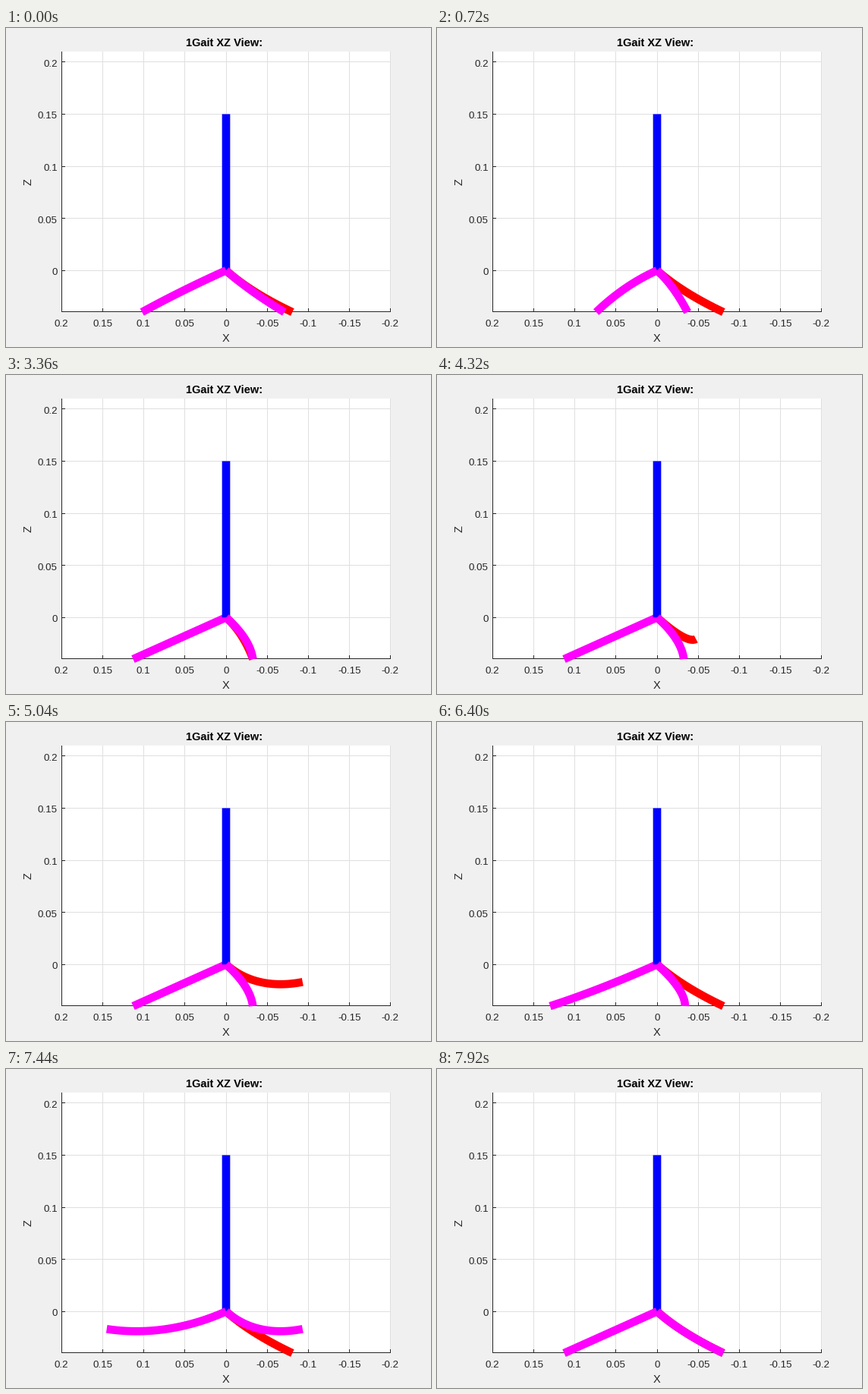
A matplotlib script that plays this animation: 560x420 px, repeating every 8000 ms.

```python
import numpy as np
import matplotlib.pyplot as plt
from matplotlib.animation import FuncAnimation
from matplotlib.patches import Rectangle

W, H, DPI = 560, 420, 100
PX = 72 / DPI                      # one pixel in points
FRAMES, STEP_MS = 100, 80
INK, GRID, PAPER = "#262626", "#dfdfdf", "#f0f0f0"

LIMB = 0.15                        # limb length
BEND = 0.55                        # total bending angle, rad
FLOOR = -0.04                      # lower limit of the z axis
TURN = np.pi / 20                  # bending direction change per frame
REAR = 2 * np.pi / 3               # azimuth of the two rear legs
SIDE = np.sin(REAR)
BEHIND, BODY, FRONT = 4, 5, 6      # depth layers

plt.rcParams["font.family"] = "Liberation Sans"
fig = plt.figure(figsize=(W / DPI, H / DPI), dpi=DPI, facecolor=PAPER)
ax = fig.add_axes([0, 0, 1, 1])
ax.set_xlim(0, W)
ax.set_ylim(H, 0)
ax.axis("off")


def px(x):
    return 290 - 1083 * x


def py(z):
    return 319.2 - 1372 * z


def rule(xs, ys, color, z):
    ax.plot(xs, ys, color=color, lw=PX, solid_capstyle="butt", zorder=z,
            snap=False)


def label(x, y, text, size=13.33, color=INK, **kw):
    kw = {"ha": "center", "va": "baseline", **kw}
    ax.text(x, y, text, fontsize=size * PX, color=color, **kw)


def limb(color, z):
    return ax.plot([], [], color=color, lw=10.67 * PX, zorder=z, snap=False,
                   solid_capstyle="butt", solid_joinstyle="round")[0]


def draw_axes():
    ax.add_patch(Rectangle((73, 31), 434, 343, fc="white", ec="none", zorder=0))
    for k in range(9):
        x = np.floor(73.5 + 54.125 * k) + 0.5
        rule([x, x], [31, 374], GRID, 1)
        rule([x, x], [369, 374], INK, 2)
        label(x - 0.3, 393, "0" if k == 4 else f"{0.2 - 0.05 * k:.2g}")
    for k in range(5):
        y = np.floor(py(0.05 * k) + 0.1) + 0.5
        rule([73, 507], [y, y], GRID, 1)
        rule([73, 78], [y, y], INK, 2)
        label(68, py(0.05 * k) + 6, f"{0.05 * k:.2g}", ha="right")
    rule([73.5, 73.5], [31, 374], INK, 2)
    rule([73, 507], [373.5, 373.5], INK, 2)
    label(288, 24, "1Gait XZ View:", 14.67, "black", weight="bold")
    label(289.7, 413, "X", 14.67)
    label(29, 202.5, "Z", 14.67, rotation=90, va="center")


def limb_path(azimuth, side, phase):
    """Constant-curvature limb seen along y, cut where it meets the floor."""
    a = np.linspace(0, BEND, 60)
    radius = LIMB / BEND
    along = radius * np.sin(a)
    off = radius * (1 - np.cos(a))
    up, lateral = -off * np.sin(phase), off * np.cos(phase)
    c, d = np.cos(azimuth), np.sqrt(8) / 3
    x = c * (d * along + up / 3) - side * lateral
    z = -along / 3 + d * up
    below = np.flatnonzero(z < FLOOR)
    if below.size:
        i = below[0]
        t = (FLOOR - z[i - 1]) / (z[i] - z[i - 1])
        x = np.append(x[:i], x[i - 1] + t * (x[i] - x[i - 1]))
        z = np.append(z[:i], FLOOR)
    return px(x), py(z)


draw_axes()
body = limb("#0000ff", BODY)
body.set_data([px(0), px(0)], [py(0), py(LIMB)])
red_leg = limb("#ff0000", BEHIND)
right_leg = limb("#ff00ff", FRONT)
left_leg = limb("#ff00ff", FRONT)


def update(i):
    pair = TURN * (min(i + 1, 20) + max(i - 79, 0))
    single = TURN * np.clip(i - 29, 0, 40)
    red_leg.set_data(*limb_path(REAR, SIDE, single))
    right_leg.set_data(*limb_path(REAR, SIDE, pair))
    left_leg.set_data(*limb_path(0, 0, pair))
    # the left leg sways from one side of the body to the other
    left_leg.set_zorder(FRONT if np.cos(pair) > 0 else BEHIND)
    return red_leg, right_leg, left_leg


anim = FuncAnimation(fig, update, frames=FRAMES, interval=STEP_MS,
                     repeat=True, repeat_delay=0)
plt.show()
```
